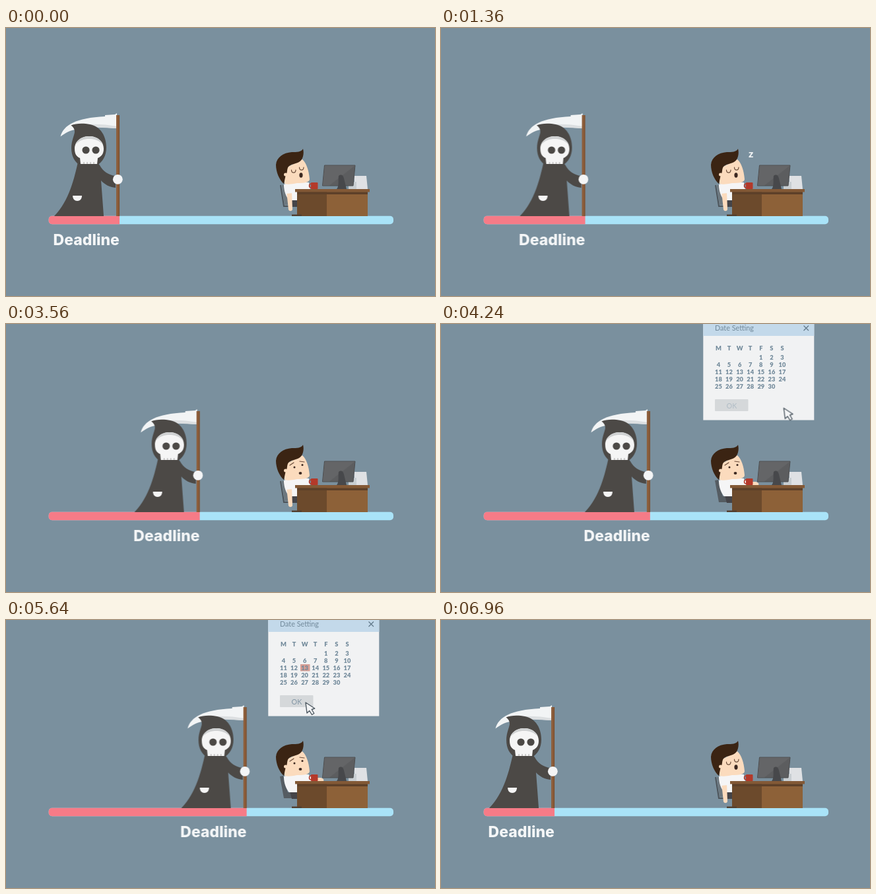
Recreate the animation shown at these times as an HTML page. Size 650x406 px, loop 7000 ms.

```html
<!DOCTYPE html>
<html lang="en">
<head>
<meta charset="utf-8">
<title>Deadline</title>
<style>
  html, body { margin: 0; width: 100%; height: 100%; overflow: hidden; background: #7a909e; }
  svg { display: block; width: 100%; height: 100%; }

  /* every part shares one 7 s timeline */
  .walk, .asleep, .awake, .hang, .typing, .popup, .cursor, .picked, .pressed, .snore {
    animation: 7s linear infinite;
  }
  .walk { animation-name: walk; }
  .asleep, .awake, .hang, .typing, .picked, .pressed, .snore { animation-timing-function: step-end; }
  .asleep { animation-name: asleep; }
  .awake { animation-name: awake; }
  .hang { animation-name: hang; }
  .typing { animation-name: typing; }
  .popup { animation-name: popup; }
  .cursor { animation-name: cursor; }
  .picked { animation-name: picked; }
  .pressed { animation-name: pressed; }
  .snore { animation-name: snore; }

  @keyframes walk {
    0% { transform: translateX(0); }
    82.286% { transform: translateX(196.7px); }
    84% { transform: translateX(196.7px); animation-timing-function: ease-in-out; }
    95.43%, 100% { transform: translateX(0); }
  }
  @keyframes asleep { 0% { opacity: 1; } 46% { opacity: 0; } 95.5%, 100% { opacity: 1; } }
  @keyframes awake { 0% { opacity: 0; } 46% { opacity: 1; } 95.5%, 100% { opacity: 0; } }
  @keyframes hang { 0% { opacity: 1; } 53% { opacity: 0; } 92%, 100% { opacity: 1; } }
  @keyframes typing { 0% { opacity: 0; } 53% { opacity: 1; } 92%, 100% { opacity: 0; } }
  @keyframes popup { 0%, 56% { opacity: 0; } 59%, 80.9% { opacity: 1; } 82.3%, 100% { opacity: 0; } }
  @keyframes cursor {
    0%, 60% { transform: translate(520px, 128px); animation-timing-function: ease-in-out; }
    68%, 72.5% { transform: translate(455.5px, 73.5px); animation-timing-function: ease-in-out; }
    78.5%, 100% { transform: translate(454px, 125px); }
  }
  @keyframes picked { 0% { opacity: 0; } 69%, 100% { opacity: 1; } }
  @keyframes pressed { 0% { fill: #b1bdc6; } 79.4%, 100% { fill: #8296a5; } }
  @keyframes snore { 0% { opacity: 0; } 3% { opacity: 1; } 46%, 100% { opacity: 0; } }

  .z { animation: z 1s linear -0.8s infinite; font: 700 15px "Open Sans", sans-serif; fill: #f2f4f5; }
  .z2 { animation-delay: -0.58s; font-size: 21px; }
  .z3 { animation-delay: -0.36s; font-size: 25px; }
  @keyframes z {
    0%, 4% { opacity: 0; transform: translateY(0); }
    12%, 25% { opacity: 1; }
    40% { opacity: .5; }
    55%, 100% { opacity: 0; transform: translateY(-4px); }
  }

  .title { font: 800 23px Inter, sans-serif; fill: #f4f6f7; text-anchor: middle; }
  .cal { font: 900 9.3px Lato, sans-serif; fill: #71899a; text-anchor: middle; }
  .ui { font: 400 10.8px Lato, sans-serif; }
  .line { fill: none; stroke: #6a4c3a; stroke-width: 1.2; stroke-linecap: round; }
</style>
</head>
<body>
<svg viewBox="0 0 650 406">
  <defs>
    <clipPath id="track"><rect x="64.700" y="284.700" width="522.300" height="12.600" rx="5"/></clipPath>
  </defs>

  <g clip-path="url(#track)">
    <rect x="64" y="284" width="524" height="14" fill="#a9e3f8"/>
    <rect class="walk" x="-200" y="284" width="372" height="14" fill="#f67b87"/>
  </g>

  <!-- reaper -->
  <g class="walk">
    <path fill="#f2f4f5" d="M82.500 164.500C87 147 106 136 150 134V132L165 131L168 129V152C140 150 118 148 105 154C97 155 90 159 82.500 164.500Z"/>
    <path fill="#dcdfe1" d="M118 146C136 145 154 146 168 149V152C146 151 132 150 118 150Z"/>
    <g fill="#4c4946">
      <path d="M109 203C104 225 96 262 73 285H148L144 231C149 237 157 241 166 242V224C155 223 147 217 142 208L138 203Z"/>
      <path d="M98.500 147.500C106 144 118 144 127 146C144 149 152 165 152 181C152 194 146 203 138 208H112C104 203 99 194 99 182C99 170 104 162 104 157C104 153 102 150 98.500 147.500Z"/>
    </g>
    <path fill="#f5f5f5" d="M126 164C139 164 148 172 148 183C148 191 144 195 139 197L138 206H113L112 197C107 195 104 191 104 183C104 172 113 164 126 164Z"/>
    <path fill="#cfd1d2" d="M105 177C108 168 117 164 126 164C135 164 144 168 147 177C141 170 134 168 126 168C118 168 111 170 105 177Z"/>
    <g fill="#4c4946">
      <circle cx="121" cy="185" r="5.6"/>
      <circle cx="136" cy="185" r="5.6"/>
    </g>
    <path stroke="#a3a2a0" d="M118 203V206M123 203V206M128 203V206M133 203V206"/>
    <path fill="#f5f5f5" d="M101 254H115C115 259 112 262 108 262C104 262 101 259 101 254Z"/>
    <rect x="167" y="132" width="5" height="153" fill="#8d5e3b"/>
    <rect x="170.500" y="132" width="1.500" height="153" fill="#7c4f30"/>
    <circle cx="169.300" cy="229.300" r="7.400" fill="#f4f5f6"/>
    <text class="title" x="121.700" y="328.500">Deadline</text>
  </g>

  <!-- worker -->
  <g>
    <g class="hang">
      <path d="M416 238L421 270H441" fill="none" stroke="#4d545a" stroke-width="2"/>
      <path d="M418 238H425L429 268H422Z" fill="#6d777e"/>
    </g>
    <path class="typing" d="M415 237L420 236L427 261H441V270H421Z" fill="#555c62"/>
    <path fill="#454448" d="M430 259H442V271H433Z"/>
    <path fill="#f5f5f6" d="M421 237C428 234 446 232 459 234L461 245L441 247V261H429C424 255 421 247 421 237Z"/>

    <path fill="#fbdbbd" d="M422 213L449 199C455 204 459 216 460 229C460 234 452 235 441 235C432 237 426 237 422 236Z"/>
    <path fill="#3b2413" d="M409 207C410 196 420 189 433 188C441 188 447 188 450 183C452 190 450 200 444 203C439 206 431 206 428 210C425 214 427 219 424 222L421 236C414 230 409 218 409 207Z"/>
    <circle cx="423.500" cy="222" r="2.500" fill="#fbdbbd"/>

    <g class="asleep">
      <path class="line" d="M432.500 215C432.500 220.500 439 220.500 439 215M444.500 211C444.500 216.500 451 216.500 451 211"/>
      <ellipse cx="447" cy="223" rx="2.600" ry="3.700" fill="#3b2821"/>
    </g>
    <g class="awake">
      <path class="line" d="M430 214L436 210M445 208L452 209"/>
      <g fill="#3b2821">
        <circle cx="437" cy="217" r="1.500"/>
        <circle cx="449" cy="213.500" r="1.500"/>
        <ellipse cx="446" cy="226" rx="2.400" ry="2"/>
      </g>
    </g>

    <g class="hang">
      <path fill="#fbdbbd" d="M425 247H433L434 275C433 278 429 278 428 275Z"/>
      <path fill="#f5f5f6" d="M421 238L432 238L435 250L424 251Z"/>
    </g>
    <g class="typing">
      <path fill="#f5f5f6" d="M422 240L434 238L441 248V261L428 260Z"/>
      <path fill="#f5f5f6" d="M440 236H459L470 240V245H440Z"/>
      <path fill="#fbdbbd" d="M466 239L477 239C481 240 482 242 481 244H466Z"/>
    </g>
  </g>

  <!-- desk -->
  <g>
    <path fill="#dfe1e4" d="M527 224H546L548 244H529Z"/>
    <path fill="#c8ced2" d="M519 233H531V244H519Z"/>
    <path fill="#5c5d5f" stroke="#4b4c4e" d="M482.500 208H529L526 239H479.500Z"/>
    <path fill="#646567" d="M483 208.500H528.500L490 238.500H480Z"/>
    <path fill="#47484b" d="M504 224C508 221 511 223 512 228L516 244H501C505 240 503 229 504 224Z"/>
    <circle cx="462.500" cy="239" r="3" fill="none" stroke="#b23a2a" stroke-width="1.500"/>
    <rect x="462" y="234" width="10.500" height="10" rx="1" fill="#b4392a"/>
    <rect x="441" y="247" width="45" height="38" fill="#6c4a2c"/>
    <rect x="486" y="247" width="62" height="38" fill="#8d6138"/>
    <rect x="438" y="244" width="113" height="4.500" fill="#835936"/>
    <rect x="441" y="248.500" width="107" height="3.500" fill="#5d4029"/>
    <rect x="433" y="282.500" width="15" height="2.500" fill="#524030"/>
  </g>

  <g class="snore">
    <text class="z" x="466" y="197">z</text>
    <text class="z z2" x="475.500" y="189">z</text>
    <text class="z z3" x="488" y="178">z</text>
  </g>

  <!-- date dialog -->
  <g class="popup">
    <rect x="397.300" y="-10" width="168" height="155.600" fill="#f1f2f3"/>
    <rect x="397.300" y="-10" width="168" height="28" fill="#c3d9ea"/>
    <text class="ui" x="415" y="10" fill="#71899a">Date Setting</text>
    <path d="M549.500 2.500L557 10M557 2.500L549.500 10" stroke="#617889" stroke-width="1.200"/>
    <rect class="picked" x="446" y="67" width="14.500" height="10.500" fill="#d59d94"/>
    <g class="cal" id="days"></g>
    <rect x="415" y="114" width="50.500" height="18" rx="1" fill="#d5d8da"/>
    <text class="ui pressed" x="440.500" y="127.500" text-anchor="middle">OK</text>
    <g class="cursor">
      <path d="M0 0L2 16L5.800 12.500L9.500 18.500L12.800 16.500L9.200 10.500L13.800 9Z" fill="#f4f5f6" stroke="#4f5a63" stroke-width="1.400" stroke-linejoin="round"/>
    </g>
  </g>
</svg>
<script>
  const days = document.getElementById("days");
  const firstColumn = 4;

  function addCell(label, column, y) {
    const cell = document.createElementNS("http://www.w3.org/2000/svg", "text");
    cell.setAttribute("x", 420.4 + column * 16.1);
    cell.setAttribute("y", y);
    cell.textContent = label;
    days.append(cell);
  }

  [..."MTWTFSS"].forEach((name, column) => addCell(name, column, 40.2));
  for (let day = 1; day <= 30; day++) {
    const slot = day - 1 + firstColumn;
    addCell(day, slot % 7, 53.8 + Math.floor(slot / 7) * 11.1);
  }
</script>
</body>
</html>
```
